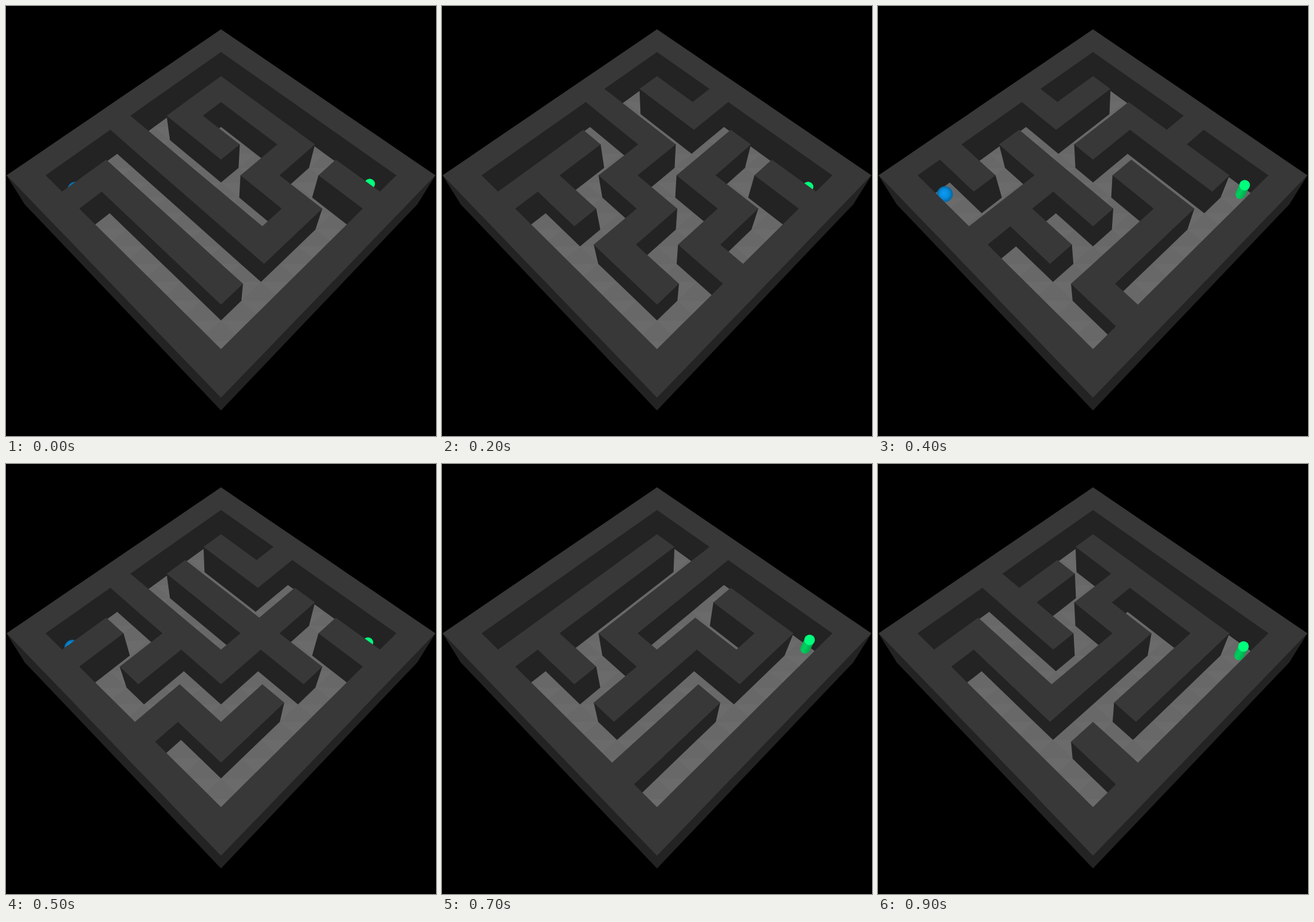
Write an HTML page with a canvas that moves like this. It is 720 by 720 pixels and loops after 1 s.

```html
<!DOCTYPE html>
<html lang="en">
<head>
<meta charset="utf-8">
<title>Maze</title>
<style>
html, body { margin: 0; width: 100%; height: 100%; overflow: hidden; background: #000; }
canvas { display: block; }
</style>
</head>
<body>
<canvas id="stage" width="720" height="720"></canvas>
<script>
const ctx = document.getElementById('stage').getContext('2d');
const SIZE = 11, FLOOR = 1.5, BASE = 2, STEP = 100;
const DIRS = { R: [1, 0], L: [-1, 0], D: [0, 1], U: [0, -1] };

// Each pillar, row by row, grows one wall in the given direction.
// Then the screen position of the ball and of the post's top.
const SCENES = [
  ['RRDR ULRD LLLL DLLL', [116, 307.5], [609, 298]],
  ['RUDL RRDD UDLD LLDL', [122, 314.5], [616, 306]],
  ['RUDR LLRD DULR DLUL', [115, 317], [613, 303]],
  ['LDUD RDUL DDLU LDRU', [104, 313], [613, 297.5]],
  ['DRUL LURD RDLD LDLR', [112, 315], [614, 300]],
  ['RUDR RRDL LLLD DUDL', [111, 307.5], [606, 299]],
  ['RRUD UDUR LLDU DRDD', [117, 316], [611, 301]],
  ['DURD DUDL DULD DLUD', [117, 318], [615.5, 294.5]],
  ['RRDR DLLD DDUL LDLL', [113, 317], [622, 302]],
  ['RDLL DRDU LLDU DLLR', [118, 318], [612, 305.5]]
];

// Perspective view of grid point (u, v), h cells below the wall tops.
function project(u, v, h) {
  const d = (u + v) / 2;
  const w = 1 - 0.031245 * d + 0.0383 * h;
  return [360 + 27.03 * (u - v) / w, 360 + (46.842 * d - 321 + 19.1 * h) / w];
}

function addPoly(path, points) {
  points.forEach((p, i) => {
    const [x, y] = project(...p);
    i ? path.lineTo(x, y) : path.moveTo(x, y);
  });
  path.closePath();
}

function addTile(path, u, v, h, n = 1) {
  addPoly(path, [[u, v, h], [u + n, v, h], [u + n, v + n, h], [u, v + n, h]]);
}

function buildGrid(code) {
  const last = SIZE - 1;
  const grid = Array.from({ length: SIZE }, (_, v) =>
    Array.from({ length: SIZE }, (_, u) => !(u % last && v % last)));
  [...code.replace(/ /g, '')].forEach((c, i) => {
    const u = 2 + 2 * (i % 4), v = 2 + 2 * Math.floor(i / 4);
    const [du, dv] = DIRS[c];
    grid[v][u] = grid[v + dv][u + du] = true;
  });
  return grid;
}

function buildScene([code, ball, post]) {
  const grid = buildGrid(code);
  const tops = new Path2D(), sides = new Path2D();
  const isWall = (u, v) => Boolean(grid[v] && grid[v][u]);
  const addSide = (a, b, h) =>
    addPoly(sides, [[...a, -0.03], [...b, -0.03], [...b, h], [...a, h]]);
  for (let v = 0; v < SIZE; v++) {
    for (let u = 0; u < SIZE; u++) {
      if (!isWall(u, v)) continue;
      addTile(tops, u, v, 0);
      const corner = [u + 1, v + 1];
      if (!isWall(u + 1, v)) addSide([u + 1, v], corner, u + 1 < SIZE ? FLOOR : BASE);
      if (!isWall(u, v + 1)) addSide(corner, [u, v + 1], v + 1 < SIZE ? FLOOR : BASE);
    }
  }
  return { tops, sides, ball, post };
}

const ground = new Path2D(), facets = new Path2D();
addTile(ground, 1, 1, FLOOR, SIZE - 2);
for (let v = 1; v < SIZE - 1; v++) {
  for (let u = 1; u < SIZE - 1; u++) {
    addPoly(facets, [[u, v, FLOOR], [u + 1, v, FLOOR], [u, v + 1, FLOOR]]);
  }
}
const scenes = SCENES.map(buildScene);

function fill(path, color) {
  ctx.fillStyle = color;
  ctx.fill(path);
}

function disc(x, y, r, color) {
  const path = new Path2D();
  path.arc(x, y, r, 0, 2 * Math.PI);
  fill(path, color);
}

function drawBall([x, y]) {
  const shade = ctx.createRadialGradient(x - 2, y - 2, 1, x, y, 13.2);
  shade.addColorStop(0, '#0a9af2');
  shade.addColorStop(0.55, '#088bdb');
  shade.addColorStop(1, '#0565a0');
  disc(x, y, 13.2, shade);
}

function drawPost([x, y]) {
  const shade = ctx.createLinearGradient(x - 8, y - 4, x + 8, y + 4);
  shade.addColorStop(0, '#00b852');
  shade.addColorStop(0.4, '#00d060');
  shade.addColorStop(1, '#00a84a');
  ctx.strokeStyle = shade;
  ctx.lineWidth = 16.4;
  ctx.lineCap = 'round';
  ctx.beginPath();
  ctx.moveTo(x, y);
  ctx.lineTo(x - 7.3, y + 15);
  ctx.stroke();
  disc(x, y, 8.8, '#00ff7c');
}

function draw(index) {
  const { tops, sides, ball, post } = scenes[index];
  ctx.fillStyle = '#000';
  ctx.fillRect(0, 0, 720, 720);
  fill(ground, '#6b6b6b');
  fill(facets, '#686868');
  fill(sides, '#232323');
  drawBall(ball);
  drawPost(post);
  fill(tops, '#383838');
}

const start = performance.now();
let shown = 0;
draw(0);
function tick() {
  const index = Math.floor((performance.now() - start) / STEP) % scenes.length;
  if (index !== shown) draw(shown = index);
  requestAnimationFrame(tick);
}
requestAnimationFrame(tick);
</script>
</body>
</html>
```
